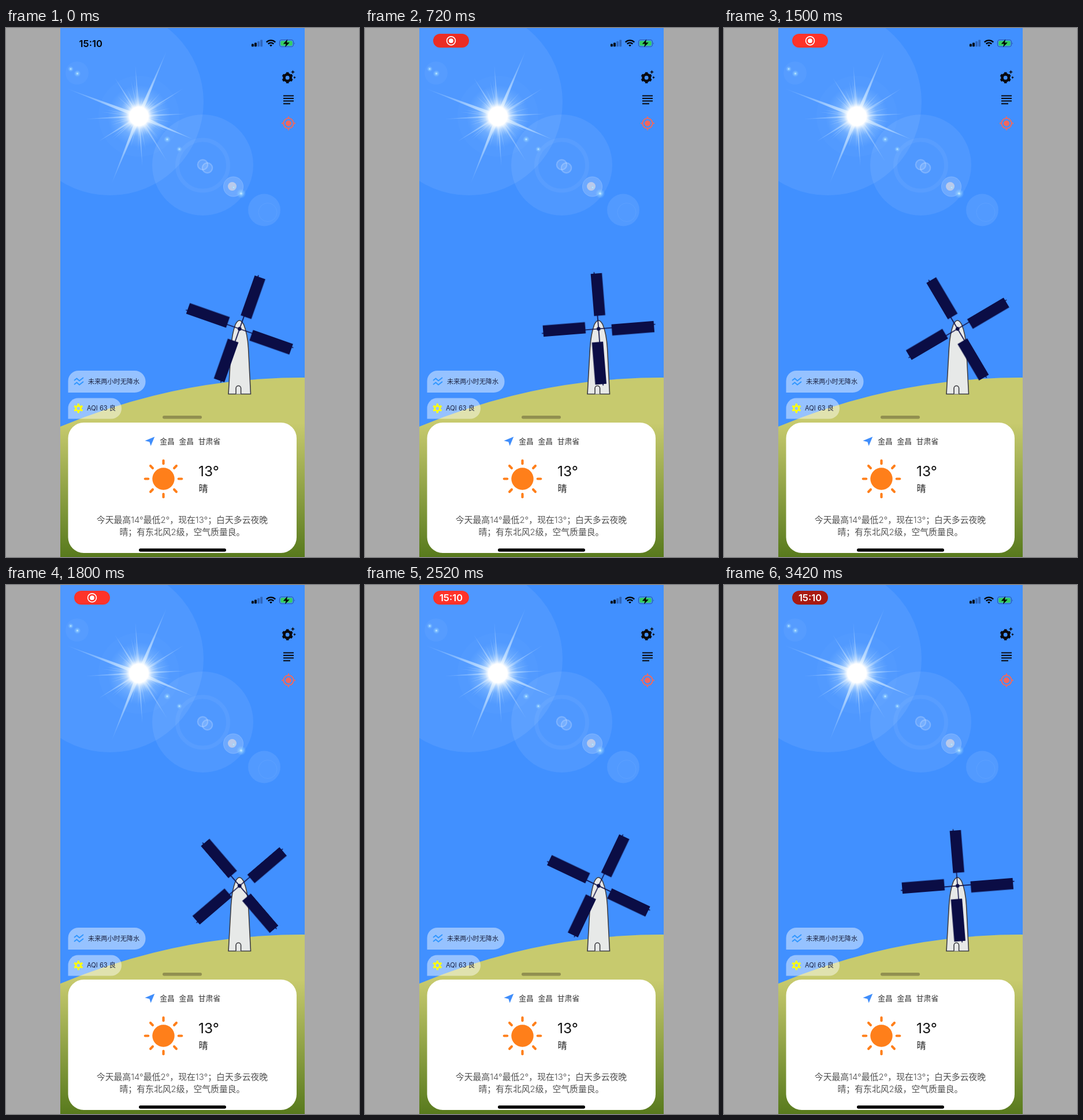
These frames come from a looping animation (611 px wide and 917 px high, 3.45 s). An HTML page:

```html
<!DOCTYPE html>
<html lang="zh-CN">
<head>
<meta charset="utf-8">
<title>Weather</title>
<style>
  html, body { margin: 0; width: 100%; height: 100%; overflow: hidden; background: #a9a9a9; }
  svg { display: block; width: 611px; height: 917px; }
  text { font-family: Inter, "Noto Sans CJK SC", "Noto Sans CJK", sans-serif; }
  .clock { font-size: 16.5px; font-weight: 600; text-anchor: middle; }
  .chip { font-size: 11.15px; fill: #1c2340; }
  .place { font-size: 12.8px; fill: #333; }
  .report { font-size: 14.85px; font-weight: 300; fill: #505050; text-anchor: middle; }
  .sails, .idle, .pill, .pill rect, .rec, .time { animation: 3450ms linear infinite; }
  .sails { animation-name: turn; animation-timing-function: steps(115, end); }
  .idle { animation-name: leave; }
  .pill { animation-name: enter; }
  .pill rect { animation-name: pulse; }
  .rec { animation-name: rec; }
  .time { animation-name: time; }
  @keyframes turn { from { transform: rotate(19.4deg); } to { transform: rotate(-95.6deg); } }
  @keyframes leave { 0%, 4% { opacity: 1; } 9%, 100% { opacity: 0; } }
  @keyframes enter { 0%, 5% { opacity: 0; } 12%, 100% { opacity: 1; } }
  @keyframes pulse {
    0%, 14%, 26%, 55%, 62%, 92% { fill: #ff3329; }
    18%, 58.5% { fill: #b92019; }
    20.9% { fill: #eb2d24; }
    99.1%, 100% { fill: #a81a12; }
  }
  @keyframes rec { 0%, 58% { opacity: 1; } 64%, 100% { opacity: 0; } }
  @keyframes time { 0%, 58% { opacity: 0; } 64%, 100% { opacity: 1; } }
</style>
</head>
<body>
<svg viewBox="0 0 611 917">
  <defs>
    <linearGradient id="grass" gradientUnits="userSpaceOnUse" x1="0" y1="685" x2="0" y2="917">
      <stop offset="0" stop-color="#c7ca6e"/>
      <stop offset="1" stop-color="#587a1d"/>
    </linearGradient>
    <radialGradient id="glow">
      <stop offset="0" stop-color="#fff"/>
      <stop offset=".3" stop-color="#fff"/>
      <stop offset=".42" stop-color="#e3f3ff" stop-opacity=".65"/>
      <stop offset=".65" stop-color="#b5dcff" stop-opacity=".27"/>
      <stop offset="1" stop-color="#a0d0ff" stop-opacity="0"/>
    </radialGradient>
    <radialGradient id="spark">
      <stop offset="0" stop-color="#e4fbff" stop-opacity=".95"/>
      <stop offset=".35" stop-color="#9fdcff" stop-opacity=".55"/>
      <stop offset="1" stop-color="#8fcaff" stop-opacity="0"/>
    </radialGradient>
    <radialGradient id="ray" gradientUnits="userSpaceOnUse" cx="0" cy="0" r="135">
      <stop offset="0" stop-color="#fff"/>
      <stop offset=".4" stop-color="#d4ebff" stop-opacity=".75"/>
      <stop offset="1" stop-color="#a8d4ff" stop-opacity=".1"/>
    </radialGradient>
    <g id="sail">
      <path d="M0 0V-98.5" stroke="#0b0d45" stroke-width="1.7"/>
      <rect x="-6" y="-96" width="19.5" height="73.3" fill="#0b0d45"/>
    </g>
  </defs>

  <rect x="94" width="423" height="917" fill="#4190ff"/>

  <g fill="#fff">
    <circle cx="180" cy="128" r="162" opacity=".075"/>
    <circle cx="230" cy="153" r="70" opacity=".02"/>
    <circle cx="340.5" cy="237.5" r="87.5" opacity=".075"/>
    <circle cx="447" cy="315.5" r="28" opacity=".09"/>
    <circle cx="123" cy="78" r="20" opacity=".04"/>
    <circle cx="393.5" cy="275" r="17.5" opacity=".17"/>
    <circle cx="340.5" cy="237" r="10" opacity=".12"/>
    <circle cx="348.5" cy="242.5" r="10" opacity=".12"/>
    <circle cx="391.5" cy="274.5" r="7.5" fill="#dcd9e2" opacity=".7"/>
  </g>
  <g fill="none" stroke="#fff">
    <circle cx="340.5" cy="238" r="44" stroke-width="7" opacity=".05"/>
    <circle cx="453" cy="319.5" r="16" opacity=".06"/>
    <circle cx="393.5" cy="275" r="17" opacity=".12"/>
    <circle cx="340.5" cy="237" r="8.5" stroke-width="2" opacity=".17"/>
    <circle cx="348.5" cy="242.5" r="8.5" stroke-width="2" opacity=".17"/>
  </g>
  <g id="sparks" fill="url(#spark)"></g>
  <g transform="translate(230 153)">
    <g id="rays" fill="url(#ray)"></g>
    <circle r="54" fill="url(#glow)"/>
  </g>

  <path d="M94 691A1085 1085 0 0 1 517 606V917H94Z" fill="url(#grass)"/>

  <g fill="#e7e9e8" stroke="#3d3d42" stroke-width="1.6">
    <path d="M385 634.5L389.5 555Q391 530 397 514Q404 500 411.5 514Q418 530 419.5 555L423.5 634.5Z"/>
    <path d="M398 634.5V624.5a4.3 4.3 0 0 1 8.6 0V634.5"/>
  </g>
  <g transform="translate(404.3 521.5)">
    <g class="sails">
      <use href="#sail"/>
      <use href="#sail" transform="rotate(90)"/>
      <use href="#sail" transform="rotate(180)"/>
      <use href="#sail" transform="rotate(270)"/>
      <circle r="3.2" fill="#0b0d45"/>
    </g>
  </g>

  <g fill="#fff" fill-opacity=".45">
    <path d="M107.5 632V612a18 18 0 0 1 18-18H223a18.5 18.5 0 0 1 18.5 18.5v1A18.5 18.5 0 0 1 223 632Z"/>
    <path d="M107.5 677.5V659a17.5 17.5 0 0 1 17.5-17.5H182a18 18 0 0 1 0 36Z"/>
  </g>
  <path d="M118 611l4.5-3.5 4.5 4 7-5.5M118 618l4.5-3.5 4.5 4 7-5.5" fill="none" stroke="#2f96ff" stroke-width="1.9"/>
  <text class="chip" x="142" y="616.8">未来两小时无降水</text>
  <g id="bloom" transform="translate(125.3 659.3)" fill="none" stroke="#ffff0a"></g>
  <text class="chip" x="140" y="663.2">AQI 63 良</text>

  <rect x="271" y="672" width="68" height="5.5" rx="2.75" fill="#918f50"/>
  <rect x="107.5" y="684" width="395.5" height="226" rx="27" fill="#fff"/>
  <path d="M240.5 715.5L257.3 708.5L250.6 724.5L248.4 717.5Z" fill="#3f8dfb"/>
  <text class="place" x="266.3" y="720.5">金昌</text>
  <text class="place" x="299.5" y="720.5">金昌</text>
  <text class="place" x="332.8" y="720.5">甘肃省</text>
  <g id="sun" transform="translate(272.5 781.5)" stroke="#ff7f1a" stroke-width="4.2" stroke-linecap="round">
    <circle r="19.2" fill="#ff7f1a" stroke="none"/>
  </g>
  <text x="333" y="777" font-size="24.5" fill="#111">13°</text>
  <text x="333.5" y="804.3" font-size="16" fill="#222">晴</text>
  <text class="report" x="305" y="858.3">今天最高14°最低2°，现在13°；白天多云夜晚</text>
  <text class="report" x="305" y="878.6">晴；有东北风2级，空气质量良。</text>
  <rect x="230" y="902.3" width="151" height="5.4" rx="2.7"/>

  <g id="gear" transform="translate(487.2 86.2)" fill="none" stroke="#0a0a0f">
    <circle r="5.7" stroke-width="4.6"/>
  </g>
  <path d="M496.5 72.7l1 2.6 2.6 1-2.6 1-1 2.6-1-2.6-2.6-1 2.6-1ZM499.5 83.2l.8 1.7 1.7.8-1.7.8-.8 1.7-.8-1.7-1.7-.8 1.7-.8Z" fill="#0a0a0f"/>
  <path d="M480 117.5H498M480 122H498M480 126.6H498M480 131.2H492" stroke="#0a0a0f" stroke-width="2"/>
  <g transform="translate(489 165.3)" fill="none" stroke="#f0685f" stroke-width="2">
    <circle r="8.7"/>
    <circle r="5" fill="#f0685f" stroke="none"/>
    <path d="M0-12V-8M0 12V8M-12 0H-8M12 0H8"/>
  </g>

  <rect x="425" y="27.6" width="3.9" height="4.6" rx="1"/>
  <rect x="430" y="25.6" width="3.9" height="6.6" rx="1"/>
  <rect x="435.1" y="23" width="3.9" height="9.2" rx="1" fill="#2e66bd"/>
  <rect x="440.2" y="20.4" width="3.9" height="11.8" rx="1" fill="#2e66bd"/>
  <g fill="none" stroke="#000" stroke-width="2.3">
    <path d="M450.8 24.6a11 11 0 0 1 15.4 0M453.7 27.6a6.9 6.9 0 0 1 9.6 0"/>
    <path d="M456.1 29.7L458.5 32.3L460.9 29.7Q458.5 28 456.1 29.7Z" fill="#000" stroke="none"/>
  </g>
  <rect x="473.5" y="20.5" width="24" height="12" rx="3.8" fill="none" stroke="#2b5cab" stroke-width="1.2"/>
  <rect x="475.2" y="22.2" width="20.6" height="8.6" rx="2.2" fill="#35cd63"/>
  <path d="M498.8 24.4q1.8 2 0 4.2Z" fill="#2b5cab"/>
  <path d="M487.3 19.6L479.8 27.4H484.6L483 33.2L490.8 25.2H485.9Z"/>

  <text class="clock idle" x="146.7" y="32.6">15:10</text>
  <g class="pill">
    <rect x="118" y="10" width="62" height="24" rx="12"/>
    <g class="rec">
      <circle cx="149" cy="22.2" r="7.4" fill="none" stroke="#fff" stroke-width="1.7"/>
      <circle cx="149" cy="22.2" r="3.9" fill="#fff"/>
    </g>
    <text class="clock time" x="149" y="28" fill="#fff">15:10</text>
  </g>

  <path d="M0 0H94V917H0ZM517 0H611V917H517Z" fill="#a9a9a9"/>
</svg>
<script>
  const add = (id, tag, attrs) => {
    const el = document.createElementNS("http://www.w3.org/2000/svg", tag);
    for (const key in attrs) el.setAttribute(key, attrs[key]);
    document.getElementById(id).append(el);
  };

  // Radial strokes shared by the sun, gear and bloom icons
  const spokes = (id, count, from, to, width) => {
    for (let i = 0; i < count; i++) {
      add(id, "path", { d: `M0 ${-from}V${-to}`, "stroke-width": width, transform: `rotate(${i * 360 / count})` });
    }
  };
  spokes("sun", 8, 26.3, 31.7, 4.2);
  spokes("gear", 6, 6, 9.6, 4.6);
  add("bloom", "circle", { r: 4.3, "stroke-width": 2.8 });
  spokes("bloom", 6, 5, 8.2, 3.4);

  const ray = (angle, length, width, opacity) => add("rays", "path", {
    d: `M${-width} 0L0 ${-length}L${width} 0Z`, opacity, transform: `rotate(${angle})`
  });
  // Main spikes: angle, length
  [[-69, 135], [113, 101], [23, 122], [202, 125], [-93, 92], [-4, 88],
   [176, 87], [87, 82], [-32, 78], [58, 91], [238, 82], [148, 92]]
    .forEach(([angle, length], i) => ray(angle, length, i < 4 ? 3.4 : 2.3, i < 4 ? .8 : .45));

  let seed = 11;
  const random = () => (seed = seed * 16807 % 2147483647) / 2147483647;
  for (let i = 0; i < 44; i++) ray(i * 360 / 44 + random() * 7, 32 + random() * 34, 1.6, .3);

  [[279, 193, 6], [300, 210, 5], [394, 276.5, 4], [407, 287, 8.5], [112, 71, 5], [123.5, 79, 6]]
    .forEach(([cx, cy, r]) => add("sparks", "circle", { cx, cy, r }));
</script>
</body>
</html>
```
